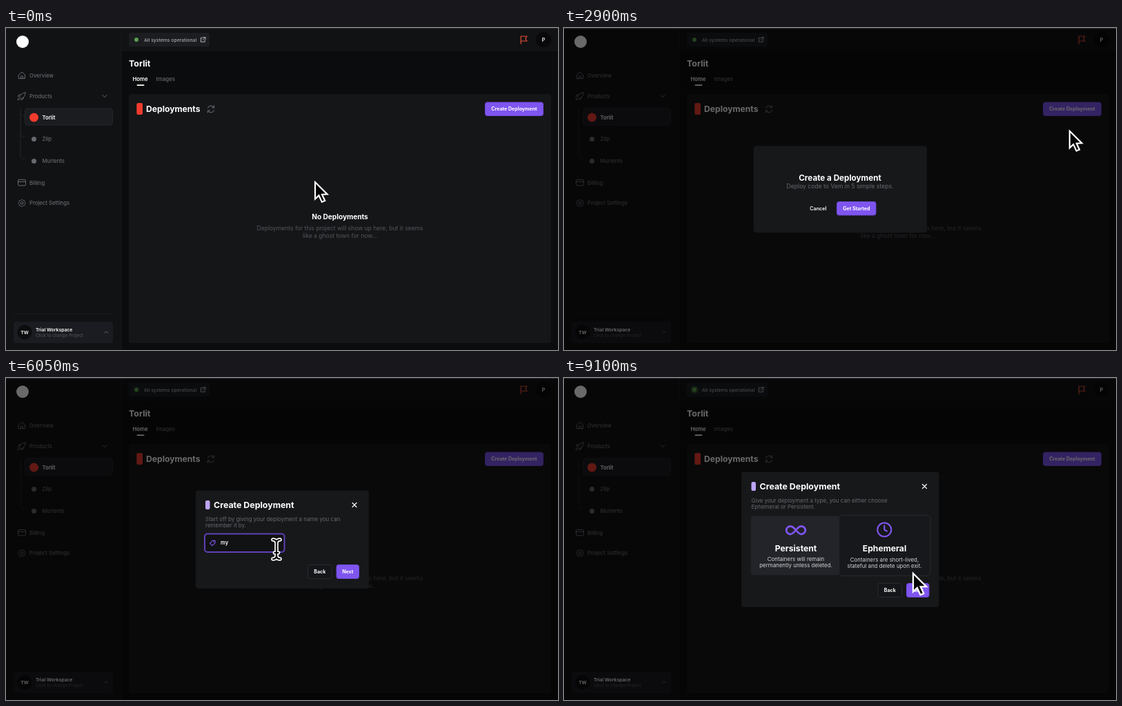
An HTML page with a canvas that plays this animation: 800 px wide and 468 px high, repeating every 9150 ms.

```html
<!DOCTYPE html>
<html lang="en">
<head>
<meta charset="utf-8">
<title>Create a deployment</title>
<style>
  html, body { margin: 0; width: 100%; height: 100%; overflow: hidden; background: #0b0c0d; }
  canvas { display: block; width: 800px; height: 468px; }
</style>
</head>
<body>
<canvas id="stage"></canvas>
<script>
const W = 800, H = 468, LOOP = 9150;
const OPEN = 2050, NAMING = 4300, FOCUS = 5450, TYPING = 5900, KEY_GAP = 110, TYPES = 8300;
const WHITE = '#fff', GREY = '#67696f', DIM = '#54565c', PURPLE = '#7f55f0', EDGE = '#6f49d8', RED = '#f03b2e';

const canvas = document.getElementById('stage');
const ctx = canvas.getContext('2d');
const dpr = window.devicePixelRatio || 1;
canvas.width = W * dpr;
canvas.height = H * dpr;

const clamp = v => Math.max(0, Math.min(1, v));
const smooth = v => { v = clamp(v); return v * v * (3 - 2 * v); };
const mix = (a, b, p) => a + (b - a) * p;

function box(x, y, w, h, r, fill, line) {
  ctx.beginPath();
  ctx.roundRect(x, y, w, h, r);
  if (fill) { ctx.fillStyle = fill; ctx.fill(); }
  if (line) { ctx.strokeStyle = line; ctx.lineWidth = 1; ctx.stroke(); }
}

function disc(x, y, r, fill) {
  ctx.beginPath();
  ctx.arc(x, y, r, 0, 7);
  ctx.fillStyle = fill;
  ctx.fill();
}

function ring(x, y, r, color, width = 1) {
  ctx.beginPath();
  ctx.arc(x, y, r, 0, 7);
  ctx.strokeStyle = color;
  ctx.lineWidth = width;
  ctx.stroke();
}

function line(d, color, width = 1) {
  ctx.strokeStyle = color;
  ctx.lineWidth = width;
  ctx.lineCap = ctx.lineJoin = 'round';
  ctx.stroke(new Path2D(d));
}

function text(s, x, y, size, weight, color, align = 'left') {
  ctx.font = `${weight} ${size}px Inter, sans-serif`;
  ctx.textAlign = align;
  ctx.fillStyle = color;
  ctx.fillText(s, x, y);
}

function button(label, x, y, w, h, fill, border) {
  box(x, y, w, h, 3, fill, border);
  text(label, x + w / 2, y + h / 2 + 2.5, 7.05, 700, WHITE, 'center');
}

function sidebar() {
  box(0, 0, 167, H, 0, '#111214');
  disc(24, 20, 9, WHITE);

  line('M18.5 68L23 64L27.5 68V73.5H18.5ZM21.5 73.5V70H24.5V73.5', GREY);
  line('M28 94C23 94 20 98 19.5 101L21.5 103C25 102 28 99 28 94ZM21.5 97H18.5L17.5 100M25 101V103L22 104.5M18 102.5L17 104.5L19.5 103.5', GREY);
  line('M140 97.5L143 100.5L146 97.5', GREY);
  box(17.5, 220.5, 11, 8.5, 1.5, null, GREY);
  line('M17.5 223.5H28.5', GREY);
  ring(23, 254.5, 1.8, GREY);
  ctx.beginPath();
  for (let i = 0; i <= 64; i++) {
    const a = i * Math.PI / 32, r = 4.7 + .6 * Math.cos(8 * a);
    ctx.lineTo(23 + r * Math.cos(a), 254.5 + r * Math.sin(a));
  }
  ctx.stroke();

  line('M21 117V186Q21 190 27 190.5M21 123Q21 127.5 27 128M21 153Q21 157.5 27 158', '#25262a');
  box(27.5, 117, 127, 24, 4, '#1b1c20', '#25262a');
  disc(40.5, 130, 6.5, RED);
  disc(40.5, 161.5, 3.5, GREY);
  disc(40.5, 193.5, 3.5, GREY);

  const items = [['Overview', 34, 71.5], ['Products', 34, 101.7], ['Zilp', 52.5, 164.4],
    ['Murlents', 52.5, 196.4], ['Billing', 34, 227.5], ['Project Settings', 34, 257.4]];
  for (const [s, x, y] of items) text(s, x, y, 7.7, 500, GREY);
  text('Torlit', 52.5, 132.8, 7.7, 600, WHITE);

  line('M11 415.5H155', '#1b1c1f');
  box(11, 427, 144, 31, 4, '#1b1c21');
  disc(27, 442, 10.5, '#0c0d0f');
  text('TW', 27, 444.6, 6.8, 600, WHITE, 'center');
  text('Trial Workspace', 43, 440.8, 6.8, 600, WHITE);
  text('Click to change Project', 43, 449.3, 6.3, 400, DIM);
  line('M143 443.2L145.3 440.9L147.6 443.2', GREY);
}

function topBar(t) {
  box(167, 0, W - 167, 34, 0, '#111214');
  line('M167 34.5H800', '#0a0a0c');
  line('M167 0V468', '#18191c');
  box(178, 7, 117, 20, 3, '#1c1d21');
  const halo = Math.max(0, Math.cos((t - 1225) / 2700 * 2 * Math.PI));
  disc(189, 17, 5.5, `rgba(88,160,72,${halo * .45})`);
  disc(189, 17, 2.9, '#5ba34e');
  text('All systems operational', 200, 19.6, 6.85, 500, '#a9abb0');
  line('M285 14.3H282.3V20.2H288.2V17.6M286 13.5H289V16.5M289 13.5L285 17.5', '#b4b6ba');
  line('M746.2 23V12H755L752.8 15.5L755 19H746.2', '#ea5136', 1.2);
  disc(779, 17, 11, '#09090b');
  text('P', 779, 19.5, 7, 600, WHITE, 'center');
}

function page(t) {
  box(0, 0, W, H, 0, '#0b0c0d');
  sidebar();
  topBar(t);
  text('Torlit', 178, 56, 12.4, 700, WHITE);
  text('Home', 183.5, 77.3, 7.8, 600, WHITE);
  text('Images', 217.5, 77.3, 7.95, 500, GREY);
  box(189.5, 82.3, 11, 1.6, .8, WHITE);

  box(178, 96, 612, 362, 4, '#151618');
  box(189.3, 109, 8.7, 17, 2, RED);
  text('Deployments', 203, 122, 12.15, 700, WHITE);
  line('M292.4 116.3A4.8 4.8 0 0 1 301 115.2M301.6 119.5A4.8 4.8 0 0 1 293 120.6M301.6 112.8V115.8H298.6M292.4 123V120H295.4', '#73757b');
  button('Create Deployment', 694.5, 108, 84, 19.5, PURPLE, EDGE);
  text('No Deployments', 484, 277.6, 10.1, 700, WHITE, 'center');
  text('Deployments for this project will show up here, but it seems', 484, 294, 8.55, 400, DIM, 'center');
  text('like a ghost town for now...', 484, 304.6, 8.55, 400, DIM, 'center');
}

// Fades and lifts one row of dialog content into place.
function reveal(t, start, row, draw) {
  const p = clamp((t - start - 30 - row * 85) / 200);
  if (!p) return;
  ctx.save();
  ctx.globalAlpha = p;
  ctx.translate(0, 6 * (1 - p));
  draw();
  ctx.restore();
}

function header(x, y, closeX, lines) {
  box(x, y - 6.5, 6.5, 13, 2, '#bda5f7');
  text('Create Deployment', x + 12, y + 4.2, 12.4, 700, WHITE);
  line(`M${closeX - 3} ${y - 3}l6 6m0 -6l-6 6`, WHITE, 1.2);
  lines.forEach((s, i) => text(s, x, y + 23.4 + i * 9.5, 8, 400, GREY));
}

function welcome(t) {
  reveal(t, OPEN, 0, () => text('Create a Deployment', 400, 222, 11.7, 700, WHITE, 'center'));
  reveal(t, OPEN, 1, () => text('Deploy code to Vem in 5 simple steps.', 400, 233.2, 8.6, 400, GREY, 'center'));
  reveal(t, OPEN, 2, () => {
    text('Cancel', 368.3, 264.7, 7.2, 600, WHITE, 'center');
    button('Get Started', 395.5, 252.5, 56.5, 19.5, PURPLE, EDGE);
  });
}

function nameForm(t) {
  const focused = t >= FOCUS;
  const typed = 'my-app'.slice(0, Math.max(0, Math.floor((t - TYPING) / KEY_GAP) + 1));
  reveal(t, NAMING, 0, () => header(289, 184.5, 505,
    ['Start off by giving your deployment a name you can', 'remember it by.']));
  reveal(t, NAMING, 1, () => {
    if (focused) box(287, 225.5, 117.5, 28.5, 5, '#5f40b8');
    box(289, 227.5, 113.5, 24.5, 3, focused ? '#111214' : '#222328');
    const tint = focused ? PURPLE : '#85878d';
    line('M295.6 240.4L299.4 236.4H303V239.8L299 243.6Z', tint, 1.1);
    disc(301.1, 238.2, .7, tint);
    if (typed) text(typed, 311, 242.4, 7.5, 600, WHITE);
    else text('Name...', 311, 242.4, 7.75, 500, DIM);
  });
  reveal(t, NAMING, 2, () => {
    button('Back', 437.5, 271.5, 34.5, 20, '#151619', '#292a2f');
    button('Next', 479, 271.5, 32.5, 20, PURPLE, EDGE);
    const disabled = 1 - clamp((t - TYPING) / 150);
    box(478.5, 271, 33.5, 21, 3, `rgba(24,25,28,${.5 * disabled})`);
  });
}

function typeCard(x, title, lines, y) {
  text(title, x, 252.3, 12.2, 700, WHITE, 'center');
  lines.forEach((s, i) => text(s, x, y + i * 9.6, 7.9, 400, '#d2d3d6', 'center'));
}

function typeForm(t) {
  reveal(t, TYPES, 0, () => header(271.5, 157.5, 522.5,
    ['Give your deployment a type, you can either choose', 'Ephemeral or Persistent.']));
  reveal(t, TYPES, 1, () => {
    box(271, 200.5, 128, 86, 4, '#232429');
    box(398.5, 199.5, 132.5, 88, 4, '#17181b', '#26272c');
    line('M336 221C332 216 330 215.5 328 215.5A5.7 5.7 0 0 0 328 227C330 227 332 226 336 221C340 216 342 215.5 344 215.5A5.7 5.7 0 0 1 344 227C342 227 340 226 336 221Z', PURPLE, 2.8);
    ring(464.3, 220.5, 10, PURPLE, 2.1);
    line('M464.3 214.5V220.5L468 222.7', PURPLE, 2.1);
    typeCard(336, 'Persistent', ['Containers will remain', 'permanently unless deleted.'], 265.6);
    typeCard(464.5, 'Ephemeral', ['Containers are short-lived,', 'stateful and delete upon exit.'], 266.8);
  });
  reveal(t, TYPES, 2, () => {
    button('Back', 455, 298.5, 34.5, 20, '#151619', '#292a2f');
    button('Next', 496.5, 298.5, 32.5, 20, PURPLE, EDGE);
  });
}

function dialog(t) {
  const shade = smooth((t - OPEN) / 150);
  if (!shade) return;
  box(0, 0, W, H, 0, `rgba(0,0,0,${.59 * shade})`);
  const a = smooth((t - NAMING) / 200), b = smooth((t - TYPES) / 200);
  const half = mix(125.5, 143.2, b);
  const top = mix(mix(171.5, 163.5, a), 136.5, b);
  const bottom = mix(mix(297.5, 306, a), 333, b);
  ctx.globalAlpha = shade;
  box(400.3 - half, top, half * 2, bottom - top, 4, '#17181a');
  ctx.globalAlpha = 1;
  (t < NAMING ? welcome : t < TYPES ? nameForm : typeForm)(t);
}

// Pointer stops: time, x, y.
const STOPS = [[0, 447, 222], [300, 447, 222], [600, 455, 229], [1050, 560, 200], [1450, 729, 142],
  [1800, 747.5, 121], [2650, 747.5, 121], [3200, 690, 200], [3700, 564, 251], [4100, 439, 264],
  [4930, 439, 264], [5350, 392, 249], [7700, 392, 249], [8150, 500, 281], [9150, 505, 282]];

// Monotone cubic through the stops.
function along(t, axis) {
  const slope = i => i < 0 || i > STOPS.length - 2 ? 0
    : (STOPS[i + 1][axis] - STOPS[i][axis]) / (STOPS[i + 1][0] - STOPS[i][0]);
  const tangent = i => {
    const a = slope(i - 1), b = slope(i);
    return a * b > 0 ? 2 * a * b / (a + b) : 0;
  };
  let i = 0;
  while (i < STOPS.length - 2 && t >= STOPS[i + 1][0]) i++;
  const span = STOPS[i + 1][0] - STOPS[i][0], p = (t - STOPS[i][0]) / span, q = 1 - p;
  return mix(STOPS[i][axis], STOPS[i + 1][axis], p * p * (3 - 2 * p))
    + span * p * q * (q * tangent(i) - p * tangent(i + 1));
}

function pointer(t) {
  const x = along(t, 1), y = along(t, 2);
  ctx.save();
  if (t > NAMING && t < TYPES && x < 403 && y < 252) {
    const beam = 'M-5 -14C-1.5 -14 0 -12 0 -9V9C0 12 -1.5 14 -5 14M5 -14C1.5 -14 0 -12 0 -9M0 9C0 12 1.5 14 5 14M-2.5 5H2.5';
    ctx.translate(x, y);
    line(beam, WHITE, 5.6);
    line(beam, '#000', 2.2);
  } else {
    const arrow = new Path2D('M0 0V25L5.5 19.8L10 29.5L14.5 27.5L10.2 18.3L18 18Z');
    ctx.translate(x + 1, y + 2);
    const size = t > NAMING ? 1.06 : .98;
    ctx.scale(size, size);
    ctx.lineJoin = 'miter';
    ctx.lineWidth = 2.2;
    ctx.strokeStyle = WHITE;
    ctx.fillStyle = '#000';
    ctx.fill(arrow);
    ctx.stroke(arrow);
  }
  ctx.restore();
}

function draw(now) {
  const t = now % LOOP;
  ctx.setTransform(dpr, 0, 0, dpr, 0, 0);
  page(t);
  dialog(t);
  box(0, 0, W, 1, 0, '#2b2c2e');
  pointer(t);
}

let began;
function tick(now) {
  began ??= now;
  draw(Math.max(0, now - began));
  requestAnimationFrame(tick);
}
requestAnimationFrame(tick);
</script>
</body>
</html>
```
